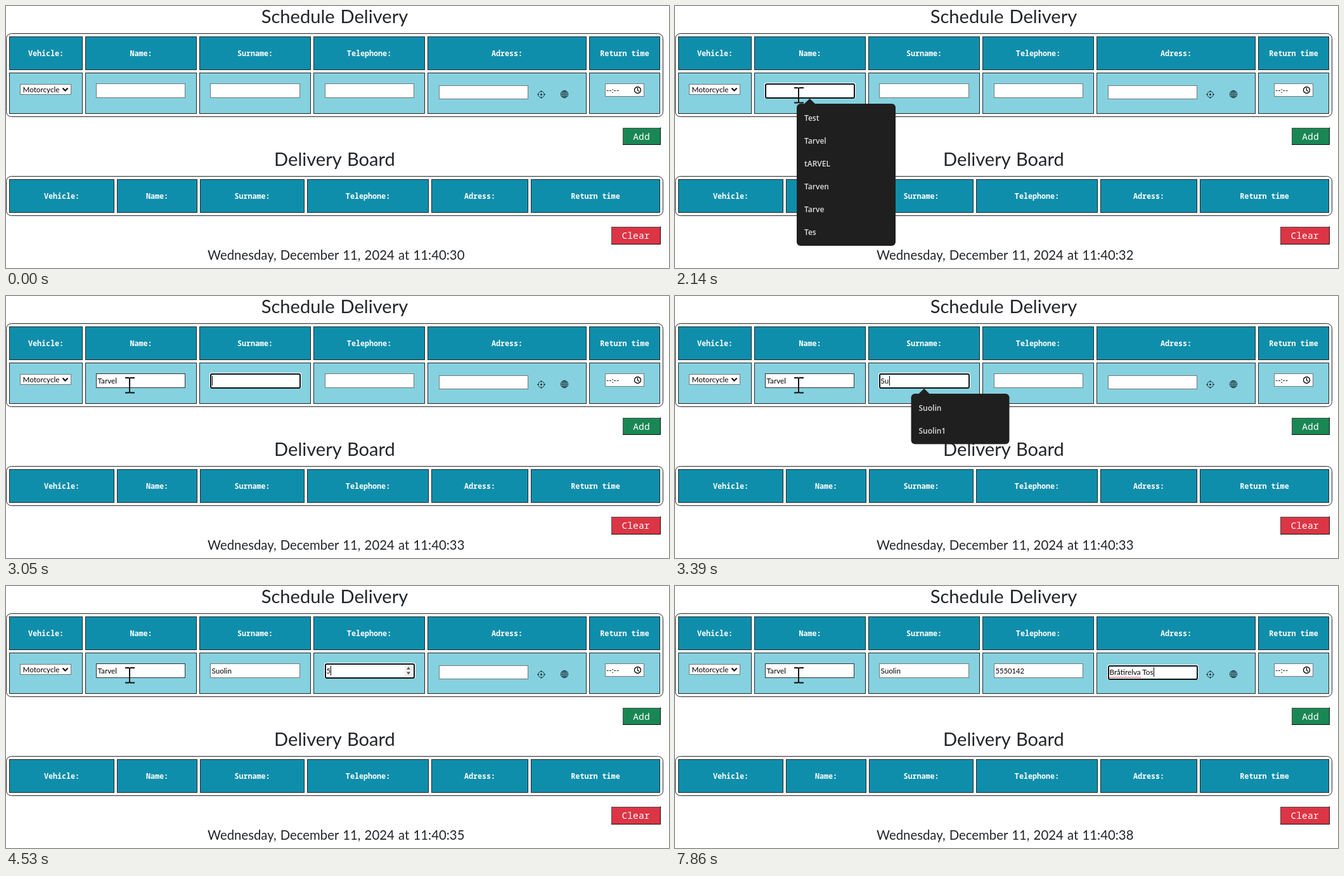
Write an HTML page that moves like this. It is 1046 px wide and 413 px high and loops after 8 s.

```html
<!DOCTYPE html>
<html lang="en">
<head>
<meta charset="utf-8">
<title>Schedule Delivery</title>
<style>
html, body { margin: 0; width: 100%; height: 100%; overflow: hidden; background: #fff; }
svg { display: block; width: 1046px; height: 413px; }
text { font-family: Lato, sans-serif; white-space: pre; }
.title { font-size: 29.1px; word-spacing: 1.5px; fill: #212529; text-anchor: middle; }
.date { font-size: 20.35px; word-spacing: 1px; fill: #212529; }
.head { font: bold 11.73px "Noto Sans Mono", monospace; fill: #fff; text-anchor: middle; }
.button { font: 14.67px "Noto Sans Mono", monospace; fill: #fff; text-anchor: middle; }
.value { font-size: 11.7px; fill: #000; }
.option { font: 600 12px "Open Sans", sans-serif; fill: #dedede; }
</style>
</head>
<body>
<svg id="stage" viewBox="0 0 1046 413"></svg>
<script>
const LOOP = 8000;
const stage = document.getElementById('stage');

function add(tag, attrs, parent = stage, label) {
  const el = document.createElementNS('http://www.w3.org/2000/svg', tag);
  for (const key in attrs) el.setAttribute(key, attrs[key]);
  if (label !== undefined) el.textContent = label;
  parent.appendChild(el);
  return el;
}
const set = (el, key, value) => el.setAttribute(key, value);
const show = (el, on) => set(el, 'visibility', on ? 'visible' : 'hidden');
const write = (cls, x, y, label, parent) => add('text', { class: cls, x, y }, parent, label);
// Outlined box whose outer edges lie on whole pixels
const box = (x, y, w, h, fill, stroke, rx = 0, parent) =>
  add('rect', { x: x + .5, y: y + .5, width: w - 1, height: h - 1, fill, stroke, rx }, parent);

function headRow(edges, y, labels) {
  labels.forEach((label, i) => {
    const [x, end] = edges[i];
    box(x, y, end - x, 53, '#0f8eab', '#212529');
    write('head', (x + end) / 2, y + 31, label);
  });
}

function button(x, y, w, h, fill, label) {
  add('rect', { x, y, width: w, height: h, fill });
  add('path', { d: `M${x + .5} ${y + h}v${.5 - h}h${w}`, fill: 'none', stroke: '#4c4c4c' });
  add('path', { d: `M${x} ${y + h - .5}h${w - .5}v${-h}`, fill: 'none', stroke: '#111' });
  write('button', x + w / 2 - .5, y + h / 2 + 5, label);
}

// Static page
const labels = ['Vehicle:', 'Name:', 'Surname:', 'Telephone:', 'Adress:', 'Return time'];
const formCols = [[5, 121], [125, 301], [305, 481], [485, 661], [665, 916], [920, 1032]];
const boardCols = [[5, 171], [175, 302], [306, 471], [475, 667], [671, 824], [828, 1032]];

write('title', 518.5, 27, 'Schedule Delivery');
box(0, 43, 1037, 132, '#fff', '#212529', 8);
headRow(formCols, 48, labels);
formCols.forEach(([x, end]) => box(x, 105, end - x, 65, '#85d1e0', '#212529'));
button(973, 192, 60, 27, '#198754', 'Add');
write('title', 518.5, 252, 'Delivery Board');
box(0, 268, 1037, 63, '#fff', '#212529', 8);
headRow(boardCols, 273, labels);
button(955, 348, 78, 28, '#dc3545', 'Clear');
const date = write('date', 318, 400, '');

// Vehicle list, time box and icons
box(22, 123, 81, 17, '#fff', '#767676');
write('value', 26.5, 136, 'Motorcycle');
add('path', { d: 'M89.5 129.5l4 4 4-4', fill: 'none', stroke: '#000', 'stroke-width': 2 });
box(945, 122, 62, 21, '#fff', '#767676');
write('value', 947, 137, '--:--');
add('path', {
  d: 'M991.5 132.5a5 5 0 1 0 10 0a5 5 0 1 0 -10 0M996.5 129v4l2.5 1.5',
  fill: 'none', stroke: '#000', 'stroke-width': 1.3
});
const thin = { fill: 'none', stroke: '#16262b', 'stroke-width': .9 };
add('circle', { cx: 844.5, cy: 139.5, r: 4.8, ...thin });
add('circle', { cx: 844.5, cy: 139.5, r: 1.5, fill: '#16262b' });
add('path', { d: 'M844.5 133v3M844.5 143v3M838 139.5h3M848 139.5h3', ...thin });
add('circle', { cx: 881, cy: 139, r: 5.7, ...thin });
add('ellipse', { cx: 881, cy: 139, rx: 2.8, ry: 5.7, ...thin });
add('path', { d: 'M881 133.3v11.4M875.3 139h11.4M876.3 136h9.4M876.3 142h9.4', ...thin });

// Each field: focus span and the time of every key press
const fields = [
  { x: 142, y: 122, h: 23, from: 1590, to: 2860, text: 'Tarvel',
    keys: [2280, 2420, 2490, 2600, 2670, 2720] },
  { x: 322, y: 122, h: 23, from: 2860, to: 3860, text: 'Suolin',
    keys: [3130, 3330, 3400, 3470, 3550, 3650] },
  { x: 503, y: 122, h: 23, from: 3860, to: 5330, text: '5550142',
    keys: [4410, 4600, 4800, 4870, 5010, 5080, 5200] },
  { x: 683, y: 125, h: 22, from: 5330, to: LOOP, text: 'Bråtirelva Tos',
    keys: [5690, 5730, 5930, 6220, 6410, 6530, 6670, 7000, 7200, 7270, 7340, 7470, 7800, 7860] }
];

fields.forEach((f, i) => {
  const { x, y, h } = f, w = i === 1 ? 142 : 141;
  f.frame = box(x, y, w, h, '#fff', '#767676');
  f.ring = add('g', {});
  add('rect', { x: x - 1, y: y - 1, width: w + 3, height: h + 2, rx: 3, fill: '#fff' }, f.ring);
  add('rect', {
    x: x + 1, y: y + 1, width: w - 1, height: h - 1, rx: 2,
    fill: '#fff', stroke: '#101010', 'stroke-width': 2
  }, f.ring);
  if (i === 2) {
    add('rect', { x: 629, y: 125, width: 12, height: 18, fill: '#f0f0f0' }, f.ring);
    add('path', { d: 'M632 131.5l3-4 3 4zM632 135.5l3 4 3-4z', fill: '#505050' }, f.ring);
  }
  f.label = write('value', x + 2.5, y + (i === 3 ? 15 : 16), '');
  if (i === 2) f.label.style.fontSize = '11.2px';
  f.caret = add('rect', { y: y + (i === 3 ? 3 : 4), width: 1, height: 15, fill: '#000' });
});
const wave = add('path', { fill: 'none', stroke: '#e8384a', 'stroke-width': 1 });

// Suggestion lists
function makePopup(x, w, rows) {
  const g = add('g', {});
  const body = add('rect', { x, y: 154, width: w, rx: 6, fill: '#1f1f1f' }, g);
  add('path', { d: `M${x + 11} 155l9.5-9 9.5 9z`, fill: '#1f1f1f' }, g);
  const lines = Array.from({ length: rows }, (_, i) => write('option', x + 12, 181 + 36 * i, '', g));
  return { g, body, lines };
}
function drawPopup(p, items, opacity) {
  set(p.g, 'opacity', opacity);
  set(p.body, 'height', 36 * items.length + (items.length > 2 ? 8 : 7.5));
  p.lines.forEach((line, i) => line.textContent = items[i] || '');
}
const names = ['Tarvel', 'tARVEL', 'Tarven', 'Tarve'];
const recent = ['Test', 'Tarvel', 'tARVEL', 'Tarven', 'Tarve', 'Tes'];
const namePopup = makePopup(192, 156, 6);
const surnamePopup = makePopup(372.5, 155, 2);

const clamp = v => Math.max(0, Math.min(1, v));
const fade = (t, open, close) =>
  t < close ? clamp((t - open + 50) / 70) * (t >= open) : .83 * clamp(1 - (t - close) / 190);

// Pointer
const arrow = add('path', {
  d: 'M0 0v24l5.6-5.3 3.6 8.2 3.7-1.6-3.5-8h7.8z', fill: '#fff', stroke: '#000', 'stroke-width': 1.2
});
const beam = add('path', {
  d: 'M188 129h5.5l1.5 1 1.5-1h6.5M195 129.5v22M188 152.5h5.5l1.5-1 1.5 1h6.5',
  fill: 'none', stroke: '#111', 'stroke-width': 2
});
const route = [
  [70, 933, 396], [280, 770, 354], [480, 645, 311], [690, 347, 251],
  [830, 308, 218], [1040, 246, 190], [1180, 203, 156], [1312, 195, 141]
];
function pointerAt(t) {
  const s = 70 + Math.floor((t - 70) / 69) * 69;
  const i = route.findIndex(p => p[0] > s);
  if (i < 0) return route[route.length - 1].slice(1);
  if (i === 0) return route[0].slice(1);
  const [a, ax, ay] = route[i - 1], [b, bx, by] = route[i];
  const k = (s - a) / (b - a);
  return [ax + (bx - ax) * k, ay + (by - ay) * k];
}

function drawField(f, t) {
  const focused = t >= f.from && t < f.to;
  const typed = f.keys.filter(k => k <= t);
  f.label.textContent = f.text.slice(0, typed.length);
  show(f.ring, focused);
  const last = Math.max(f.from, ...typed);
  show(f.caret, focused && Math.floor((t - last) / 550) % 2 === 0);
  const width = typed.length ? f.label.getComputedTextLength() : 0;
  set(f.caret, 'x', Math.round(f.x + 2.8 + width));
}

function drawWave(t) {
  const f = fields[3], on = t >= f.keys[10];
  show(wave, on);
  if (!on) return;
  const n = Math.round(f.label.getSubStringLength(0, 10) / 2);
  let d = 'M685.5 145';
  for (let i = 1; i <= n; i++) d += `L${685.5 + 2 * i} ${i % 2 ? 143 : 145}`;
  set(wave, 'd', d);
}

function render(t) {
  date.textContent = 'Wednesday, December 11, 2024 at 11:40:' + (30 + Math.floor((t + 470) / 1000));
  const [px, py] = pointerAt(t);
  const inside = px < 283 && py < 145;
  fields.forEach(f => drawField(f, t));
  set(fields[0].frame, 'stroke', inside ? '#303030' : '#767676');
  drawWave(t);
  const list = t < 2280 ? recent : t < 2420 ? [...names, 'Tarv', 'Tar'] : names;
  drawPopup(namePopup, list, fade(t, 1590, 2860));
  drawPopup(surnamePopup, ['Suolin', 'Suolin1'], fade(t, 3130, 3860));
  show(arrow, t >= 70 && !inside);
  show(beam, inside);
  set(arrow, 'transform', `translate(${px} ${py})`);
}

const start = performance.now();
function tick() {
  render((performance.now() - start) % LOOP);
  requestAnimationFrame(tick);
}
tick();
</script>
</body>
</html>
```
